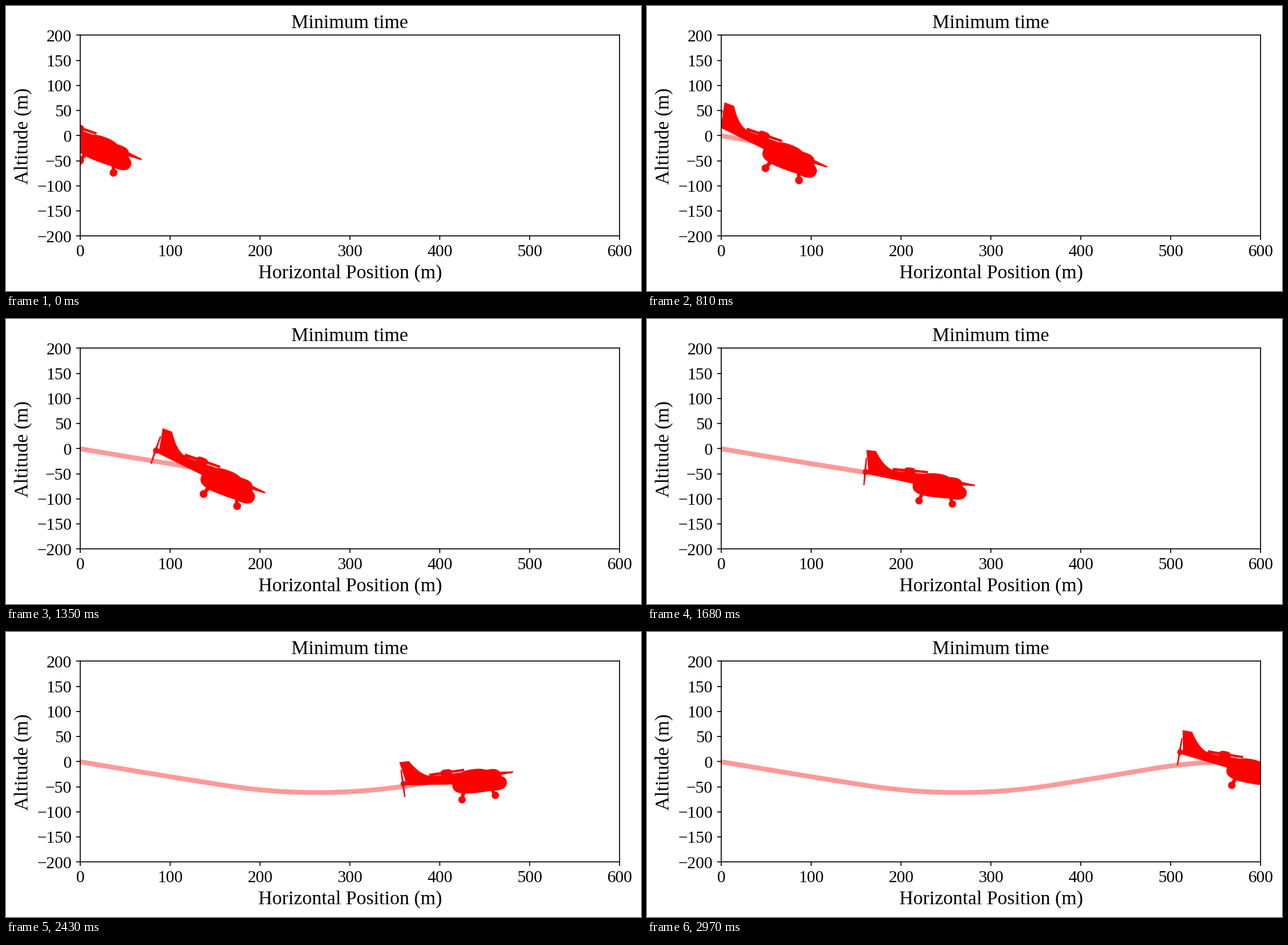
Animation of 1095x491 px, one loop 3000 ms. Source, as a matplotlib script:

```python
import numpy as np
import matplotlib.pyplot as plt
from matplotlib.animation import FuncAnimation
from matplotlib.collections import PolyCollection

W, H, DPI = 1095, 491, 150
LEFT, RIGHT, TOP, BOTTOM = 128, 1058, 50.5, 396.5
FRAMES = 100
PX_X = (RIGHT - LEFT) / 600   # pixels per metre along each axis
PX_Y = (BOTTOM - TOP) / 400

plt.rcParams["font.family"] = "Liberation Serif"


def distance(t):
    """Uniform acceleration, then a cruise with a late spurt."""
    u = np.maximum(t - 54, 0)
    return 0.0679 * np.minimum(t, 54) ** 2 + 7.95 * u + 8 * (u / 45) ** 6


def altitude(x):
    """Sum the slope: dive, steady pull-up, climb, level off."""
    fine = np.linspace(0, 570, 2000)
    slope = np.interp(fine, [0, 160, 370, 480, 564], [-.305, -.28, .285, .305, .02])
    return np.interp(x, fine, np.cumsum(slope) * (fine[1] - fine[0]))


step = np.arange(FRAMES)
xs = distance(step)
ys = altitude(xs)
tilt = np.interp(step, [48, 64, 74, 91, 99], [.375, -.15, -.2, 0, .19])  # nose down


def oval(x0, x1, y0, y1, power=2.0):
    """Superellipse that fills the given box."""
    a = np.linspace(0, 2 * np.pi, 80, endpoint=False)
    c, s = np.cos(a), np.sin(a)
    return np.column_stack([
        (x0 + x1) / 2 + (x1 - x0) / 2 * np.sign(c) * abs(c) ** (2 / power),
        (y0 + y1) / 2 + (y1 - y0) / 2 * np.sign(s) * abs(s) ** (2 / power)])


def bar(x0, y0, w0, x1, y1, w1):
    """Straight tapered bar between two points."""
    n = np.array([y0 - y1, x1 - x0]) / np.hypot(x1 - x0, y1 - y0) / 2
    a, b = np.array([x0, y0]), np.array([x1, y1])
    return np.array([a + n * w0, b + n * w1, b - n * w1, a - n * w0])


def wheel(x, y, r=6.3):
    return oval(x - r, x + r, y - r, y + r)


def fin():
    """Tail fin whose front edge eases into the fuselage."""
    s = np.linspace(0, 1, 12)
    front = np.column_stack([-69 + 39 * s, -8.5 - 30 * (1 - s) ** 2])
    return np.vstack([[-85.5, -38.5], front, [-30, 6], [-77, 2]])


# Side view of the aircraft, in pixels from its centre, y pointing down
parts = [
    bar(-79, -2.5, 9, 20, 1.5, 21),       # fuselage
    fin(),
    oval(0, 86, -8, 29, 3),               # hull
    oval(56, 93.5, 4, 29, 2.3),           # nose
    oval(12, 66, -12, 12, 2.3),           # canopy
    oval(50, 84, -8.5, 15, 2.6),          # windscreen
    bar(-37, -10.5, 5, 23.5, -12.5, 4),   # wing
    oval(-17, 2, -17, -5, 3),             # pod
    bar(76, 0.5, 7, 106, 1, 2.5),         # canard
    bar(-84, -25, 2, -83.5, -1, 3.5),     # propeller
    bar(-83.5, -1, 3.5, -83, 22, 2),
    oval(-87.5, -78, -6, 4),              # hub
    bar(18, 25, 7, 13.5, 38, 5),          # landing gear
    bar(66, 25, 6, 71.5, 37, 5),
    wheel(13.8, 37.8),
    wheel(71.3, 37),
]


def place(part, x, y, k):
    """Tilt a part about the centre and move it to a data position."""
    px, py = part.T
    return np.column_stack([x + (px - k * py) / PX_X, y - (py + k * px) / PX_Y])


# The small margin keeps the pixel size from being rounded down
fig = plt.figure(figsize=(W / DPI + 1e-6, H / DPI + 1e-6), dpi=DPI, facecolor="white")
ax = fig.add_axes([LEFT / W, 1 - BOTTOM / H, (RIGHT - LEFT) / W, (BOTTOM - TOP) / H])
ax.set(xlim=(0, 600), ylim=(-200, 200))
ax.set_xticks(range(0, 601, 100))
ax.set_yticks(range(-200, 201, 50))
ax.tick_params(labelsize=14)
ax.set_title("Minimum time", fontsize=16)
ax.set_xlabel("Horizontal Position (m)", fontsize=16)
ax.set_ylabel("Altitude (m)", fontsize=16)

trail, = ax.plot([], [], color="red", alpha=0.4, lw=4)
plane = PolyCollection([], facecolor="red", edgecolor="none", zorder=2.2)
ax.add_collection(plane, autolim=False)


def draw(i):
    trail.set_data(xs[:i + 1], ys[:i + 1])
    plane.set_verts([place(p, xs[i], ys[i], tilt[i]) for p in parts])
    return trail, plane


anim = FuncAnimation(fig, draw, frames=FRAMES, interval=30, repeat=True, repeat_delay=0)
plt.show()
```
